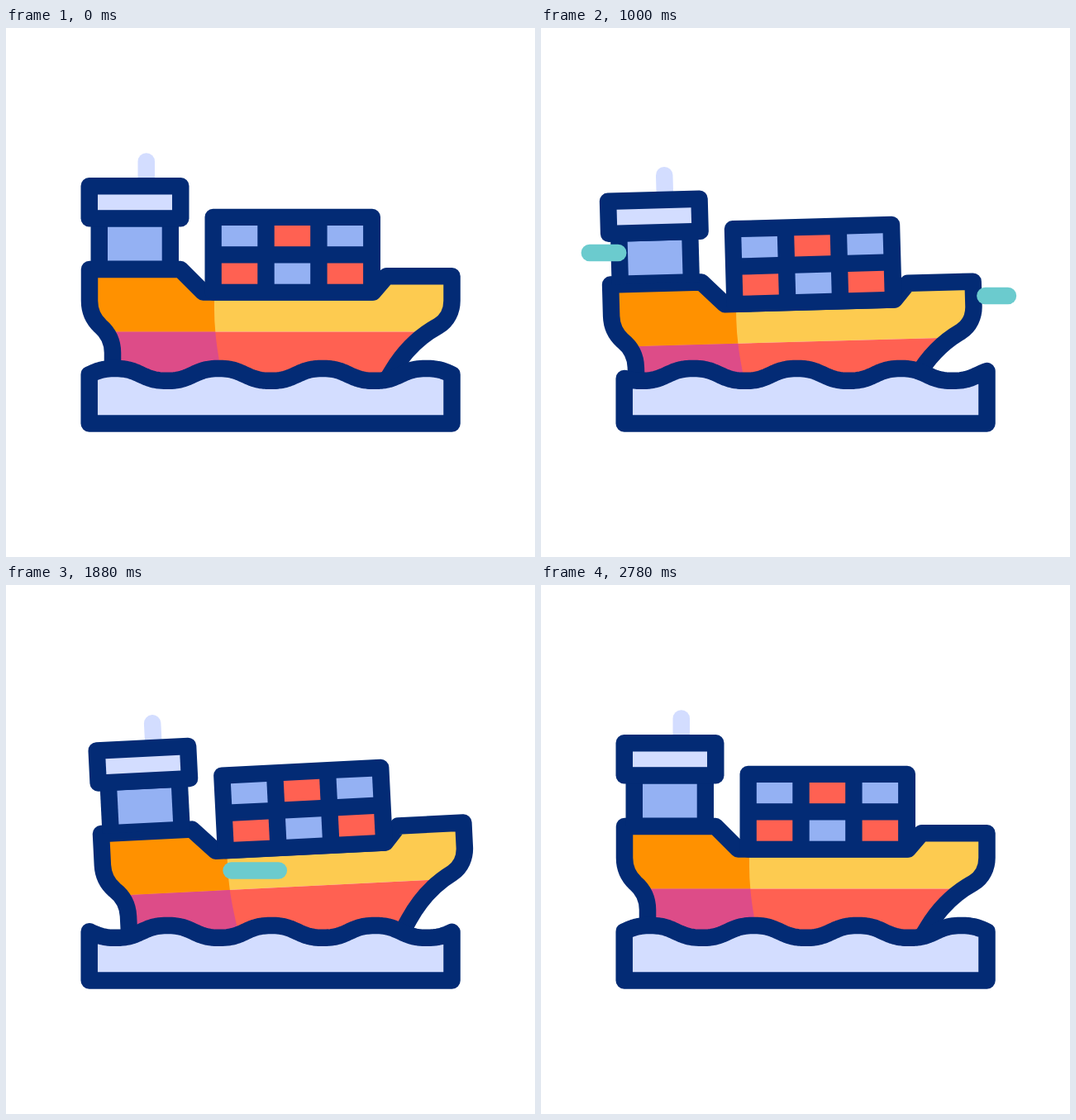
An HTML page for the animation above (2800 ms loop, 640 by 640 pixels).

```html
<!DOCTYPE html>
<html lang="en">
<head>
<meta charset="utf-8">
<title>Cargo ship</title>
<style>
  html, body { margin: 0; width: 100%; height: 100%; overflow: hidden; background: #fff; }
  svg { display: block; width: 100vw; height: 100vh; }
  .line { fill: none; stroke: #032b75; stroke-width: 20.5; stroke-linecap: round; stroke-linejoin: round; }
  .dark { fill: #032b75; }
  .pale { fill: #d3ddff; }
  .blue { fill: #94b1f3; }
  .red { fill: #ff6152; }
  .wind { stroke: #6bcbce; stroke-width: 20.5; stroke-linecap: round; }
</style>
</head>
<body>
<svg viewBox="0 0 640 640">
  <defs>
    <path id="hull" d="M129 440V393C129 380 124 369 114 360.500C105 352 101 342 101 330V292H211L238.500 319.500H444L460.500 300.300H539.500V330C539.500 342 534 354 523 360.500C500 373 482 391 468 414L452 440Z"/>
    <clipPath id="inside"><use href="#hull"/></clipPath>
  </defs>
  <g id="ship">
    <path class="pale" d="M159.500 195V161.500a10.250 10.250 0 0 1 20.500 0V195Z"/>
    <g clip-path="url(#inside)">
      <rect x="90" y="280" width="460" height="87.500" fill="#fdcb50"/>
      <rect class="red" x="90" y="367.500" width="460" height="80"/>
      <path d="M90 280H252V340Q252 354 253.300 367.500H90Z" fill="#ff9100"/>
      <path d="M90 367.500H253.300Q255 390 265 440H90Z" fill="#dd4c88"/>
    </g>
    <use href="#hull" class="line"/>
    <rect class="dark" x="102.500" y="225" width="106.500" height="67"/>
    <rect class="blue" x="123" y="240.500" width="65.700" height="41"/>
    <rect class="dark" x="90.500" y="181" width="131" height="59.500" rx="10"/>
    <rect class="pale" x="111" y="201.500" width="90" height="18.700"/>
    <rect class="dark" x="240.500" y="218.700" width="212.500" height="111" rx="10"/>
    <g id="cargo"></g>
  </g>
  <path id="water" class="line" style="fill:#d3ddff"/>
  <g id="wind" class="wind"></g>
</svg>
<script>
const LOOP = 2800;
const $ = id => document.getElementById(id);

function add(parent, tag, attrs) {
  const el = document.createElementNS('http://www.w3.org/2000/svg', tag);
  for (const k in attrs) el.setAttribute(k, attrs[k]);
  return parent.appendChild(el);
}

function ease(u) {
  u = Math.min(1, Math.max(0, u));
  return u * u * (3 - 2 * u);
}

// Eases through the values, each reached at its time.
function through(times, values, t) {
  let i = 1;
  while (i < times.length - 1 && t > times[i]) i++;
  const u = (t - times[i - 1]) / (times[i] - times[i - 1]);
  return values[i - 1] + (values[i] - values[i - 1]) * ease(u);
}

// Containers: two rows of three in alternating colours.
for (let i = 0; i < 6; i++) {
  add($('cargo'), 'rect', {
    class: i % 2 ? 'red' : 'blue',
    x: 260.8 + (i % 3) * 63.9,
    y: 239 + Math.floor(i / 3) * 45.5,
    width: 43.5, height: 25.2
  });
}

function moveShip(t) {
  const drift = [120, 970, 1710, 2700];
  const x = through(drift, [0, -16.4, 16.4, 0], t);
  const y = through(drift, [0, 12.5, -2, 0], t);
  const tilt = through([100, 820, 1420, 1960, 2700], [0, -2.8, 2.8, -3.2, 0], t);
  $('ship').setAttribute('transform', `translate(${x} ${y}) rotate(${tilt} 320 320)`);
}

// The water rolls left by two wavelengths per loop.
function moveWater(t) {
  const left = 100.7, right = 539.5, bottom = 478.5, wave = 125.5;
  const shift = 2 * wave * ease(t / LOOP);
  let d = `M${left} ${bottom}`;
  for (let i = 0; i <= 150; i++) {
    const x = left + (right - left) * i / 150;
    const a = (x + shift - 132) / wave * 2 * Math.PI;
    const y = 419.4 - 7.9 * (Math.cos(a) - 0.06 * Math.cos(3 * a));
    d += `L${x.toFixed(2)} ${y.toFixed(2)}`;
  }
  $('water').setAttribute('d', d + `V${bottom}Z`);
}

// Every gust runs left the same way: the tail follows the head after a lag.
const RUN = 560, LAG = 190;
const gusts = [
  { start: 100, x: 308, y: 386.5, length: 174 },
  { start: 470, x: 162, y: 272, length: 104 },
  { start: 805, x: 565, y: 324, length: 98 },
  { start: 1085, x: 374, y: 191, length: 207 },
  { start: 1635, x: 334, y: 345.5, length: 150 },
  { start: 1950, x: 516, y: 249.5, length: 90 }
];
for (const g of gusts) g.el = add($('wind'), 'line', { y1: g.y, y2: g.y });

function moveGust({ start, x, length, el }, t) {
  const age = t - start;
  el.style.display = age > 0 && age < RUN + LAG ? '' : 'none';
  el.setAttribute('x1', x - length * ease(age / RUN));
  el.setAttribute('x2', x - length * ease((age - LAG) / RUN));
}

function draw(t) {
  moveShip(t);
  moveWater(t);
  for (const g of gusts) moveGust(g, t);
}

const begin = performance.now();
function tick() {
  draw((performance.now() - begin) % LOOP);
  requestAnimationFrame(tick);
}
draw(0);
requestAnimationFrame(tick);
</script>
</body>
</html>
```
